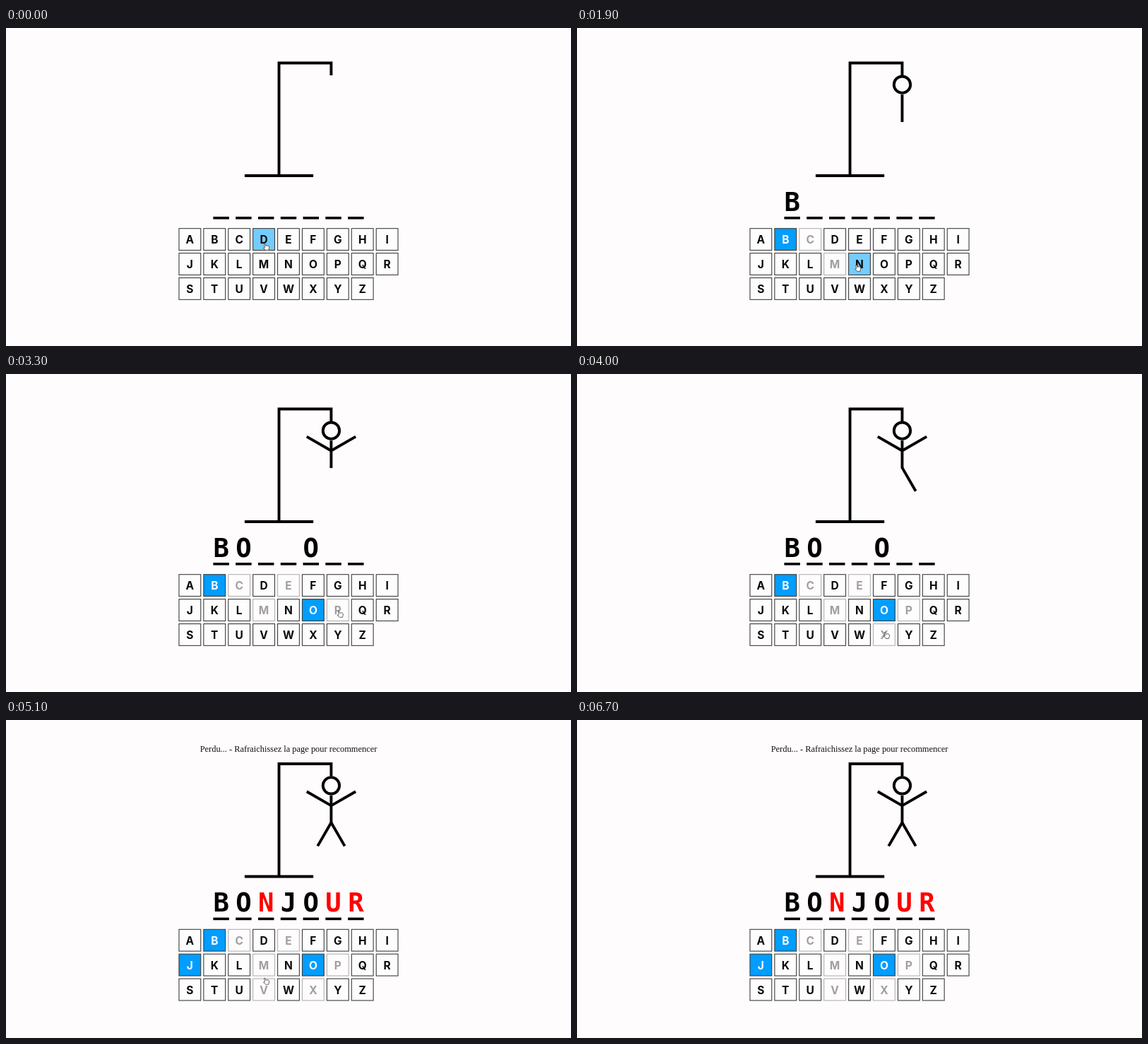
Recreate the animation shown at these times as an HTML page. Size 800 by 450 pixels, loop 6.8 s.

```html
<!DOCTYPE html>
<html lang="fr">
<head>
<meta charset="utf-8">
<title>Pendu</title>
<style>
  html, body { margin: 0; width: 100%; height: 100%; overflow: hidden; background: #fefcfd; }
  svg { display: block; width: 800px; height: 450px; }
  text { text-anchor: middle; }
  .message { font: 12.43px "Liberation Serif", "Times New Roman", serif; fill: #111; }
  .letter { font: bold 37.3px "DejaVu Sans Mono", monospace; }
  .key rect { fill: #fefdfe; stroke: #3c3c3c; stroke-width: 1.1; }
  .key text { font: 700 15.5px Inter, sans-serif; fill: #0a0a0a; }
  .key.hover rect { fill: #74ccfd; }
  .key.hit rect { fill: #019dff; }
  .key.hit text { fill: #fff; }
  .key.miss { opacity: .38; }
</style>
</head>
<body>
<svg viewBox="0 0 800 450">
  <text id="message" class="message" x="400" y="45">Perdu... - Rafraichissez la page pour recommencer</text>
  <g id="game">
    <g transform="translate(337.9 47.5) scale(.389)">
      <path d="M0 410h250v10H0zM120 0h200v50h-10V10H130v400h-10z"/>
      <g id="man">
        <circle cx="315" cy="84" r="30" fill="none" stroke="#000" stroke-width="10"/>
        <rect x="310" y="120" width="10" height="100"/>
      </g>
    </g>
    <g id="word"></g>
    <g id="keys"></g>
  </g>
  <path id="hand" fill="#fff" stroke="#333" stroke-width=".75" stroke-linejoin="round"
    d="M-.6 .4L.8 .4L1.7 3.2Q6.2 1.6 6.5 5L5.6 9.2H1.7L-1.8 6.2L.2 5.7Z"/>
</svg>
<script>
  const LOOP = 6800, STEP = 100;
  const WORD = "BONJOUR", GUESSES = "CBMOEPXJV", FIRST_KEY = "D";
  const FIRST_CLICK = 430, GAP = 570;       // clicks come at a steady pace
  const MOVE = 240, REST = 100;             // travel time, then a pause before the click
  const HAND_OFF = 5700, DROP = 12.6;
  const KEY = 31.8, PITCH = 34.91, KEY_X = 244.45, KEY_Y = 283.2, COLUMNS = 9;
  const CHAR = 22.45, SPACE = CHAR * 1.416;

  const $ = id => document.getElementById(id);
  const clamp = (v, lo, hi) => Math.min(hi, Math.max(lo, v));
  const show = (el, on) => el.setAttribute("visibility", on ? "visible" : "hidden");
  const clickTime = i => FIRST_CLICK + GAP * i;
  const lostAt = clickTime(GUESSES.length - 1);

  function add(parent, tag, attrs, text) {
    const el = document.createElementNS("http://www.w3.org/2000/svg", tag);
    for (const name in attrs) el.setAttribute(name, attrs[name]);
    if (text) el.textContent = text;
    parent.append(el);
    return el;
  }

  function addLimbs(inset, y, angle) {
    for (const side of [1, -1]) {
      const transform = `translate(${315 + side * inset} ${y}) scale(${side} 1) rotate(${angle})`;
      add($("man"), "rect", { y: -10, width: 100, height: 10, transform });
    }
  }
  addLimbs(5, 160, -30);
  addLimbs(-5, 220, 60);

  const letters = [...WORD].map((char, i) => {
    const x = 400 + (i - (WORD.length - 1) / 2) * SPACE;
    add($("word"), "rect", { x: x - CHAR / 2, y: 267, width: CHAR, height: 3.6 });
    return { char, el: add($("word"), "text", { class: "letter", x, y: 258.6 }, char) };
  });

  const keys = Array.from({ length: 26 }, (_, i) => {
    const char = String.fromCharCode(65 + i), row = Math.floor(i / COLUMNS);
    const x = KEY_X + i % COLUMNS * PITCH, y = KEY_Y + row * PITCH;
    const el = add($("keys"), "g", { class: "key" });
    add(el, "rect", { x: x + .5, y: y + .5, width: KEY - 1, height: KEY - 1 });
    add(el, "text", { x: x + KEY / 2, y: y + 22 }, char);
    return { char, row, x, y, el };
  });

  // The hand touches lower rows nearer their top edge
  function spot(char) {
    const { x, y, row } = keys.find(k => k.char === char);
    return [x + 17, y + 22 - row * 5];
  }

  function handAt(t) {
    const i = clamp(Math.ceil((t - FIRST_CLICK) / GAP), 0, GUESSES.length - 1);
    const u = clamp((t - clickTime(i) + REST + MOVE) / MOVE, 0, 1);
    const from = spot(GUESSES[i - 1] || FIRST_KEY), to = spot(GUESSES[i]);
    return from.map((v, axis) => v + (to[axis] - v) * u);
  }

  function draw(t) {
    const used = [...GUESSES].filter((_, i) => clickTime(i) <= t);
    const misses = used.filter(c => !WORD.includes(c)).length;
    const lost = t >= lostAt;
    const [hx, hy] = handAt(t);

    show($("message"), lost);
    $("game").setAttribute("transform", `translate(0 ${lost ? DROP : 0})`);
    [...$("man").children].forEach((part, i) => show(part, i < misses));

    for (const { char, el } of letters) {
      const found = used.includes(char);
      show(el, found || lost);
      el.setAttribute("fill", found ? "#000" : "#f00");
    }

    for (const { char, x, y, el } of keys) {
      const over = !lost && hx >= x && hx <= x + KEY && hy >= y && hy <= y + KEY;
      const state = used.includes(char) ? (WORD.includes(char) ? "hit" : "miss") : over ? "hover" : "";
      el.setAttribute("class", "key " + state);
    }

    show($("hand"), t < HAND_OFF);
    $("hand").setAttribute("transform", `translate(${hx} ${hy})`);
  }

  const start = performance.now();
  function tick() {
    const t = (performance.now() - start) % LOOP;
    draw(Math.floor(t / STEP) * STEP);
    requestAnimationFrame(tick);
  }
  tick();
</script>
</body>
</html>
```
